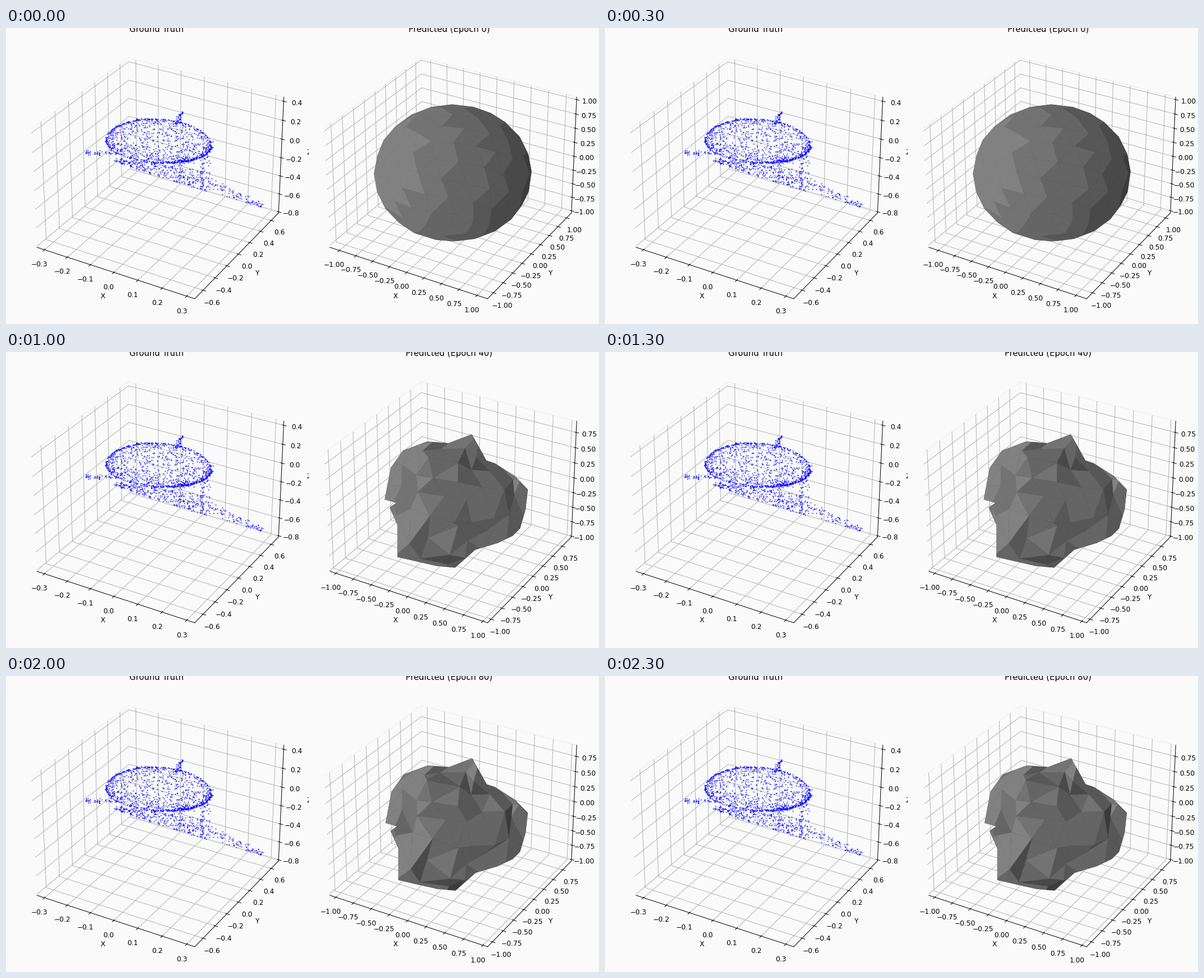
A matplotlib script that plays this animation: 1058 px wide and 529 px high, repeating every 2.5 s.

```python
from itertools import combinations

import matplotlib.pyplot as plt
import numpy as np
from matplotlib.animation import FuncAnimation
from matplotlib.patches import Polygon
from matplotlib.ticker import MultipleLocator
from mpl_toolkits.mplot3d.art3d import Poly3DCollection

WIDTH, HEIGHT = 1058, 529
BG = "#fafafa"
SIDE, TOP, LEFT_X, RIGHT_X = 501, 14.5, 17.5, 540
STEPS = 5

# Camera basis for elev=30, azim=-60 and the 4:4:3 box in view units.
RIGHTWARD = np.array([0.866025, 0.5, 0])
UPWARD = np.array([-0.25, 0.433013, 0.866025])
TOWARD = np.array([0.433013, -0.75, 0.5])
BOX = np.array([1.190476, 1.190476, 0.892857])
LIGHT = np.array([-2, -2, 1]) / 3

CLOUD_LIMITS = [(-0.333, 0.332), (-0.735, 0.74), (-0.8126, 0.443)]

# Corners of the fitted blob and the spots where its surface folds inward.
CENTER = np.array([797, 262])
OUTLINE = np.array([
    (831, 147), (857, 194), (872, 199), (908, 222), (931, 246), (927, 282),
    (917, 316), (904, 329), (877, 342), (837, 354), (801, 386), (768, 383),
    (698, 367), (698, 310), (684, 278), (696, 270), (675, 264), (686, 207),
    (708, 176), (751, 160), (789, 163)])
FOLDS = [(805, 195), (838, 188), (820, 306), (786, 368), (770, 247)]


def bounce(step):
    """A late, short squeeze while the fit settles."""
    return np.exp(-((step - 3.2) / 0.75) ** 2)


def mesh_limits(step):
    b = bounce(step)
    return [(-1.085 - 0.06 * np.exp(-2 * step), 1.06 + 0.086 * np.exp(-2 * step)),
            (-1.065 - 0.08 * np.exp(-2 * step) - 0.14 * b,
             0.985 + 0.16 * np.exp(-1.3 * step)),
            (-1.01 - 0.03 * np.exp(-3 * step) - 0.045 * b,
             0.932 + 0.11 * np.exp(-3 * step))]


def unproject(screen, depth, left, limits):
    """Turn stage pixels plus a depth toward the viewer into data coordinates."""
    x = (screen[..., 0] - left) / SIDE * 0.185 - 0.095
    y = 0.09 - (screen[..., 1] - TOP) / SIDE * 0.185
    reach = 10 - depth
    point = ((x * reach)[..., None] * RIGHTWARD + (y * reach)[..., None] * UPWARD
             + depth[..., None] * TOWARD)
    low, high = np.array(limits).T
    return (low + high) / 2 + point / BOX * (high - low)


def unit(v):
    return v / np.linalg.norm(v, axis=-1, keepdims=True)


def icosphere(level):
    golden = (1 + 5 ** 0.5) / 2
    corners = unit(np.array([np.roll((0, s, t * golden), k)
                             for k in range(3) for s in (-1, 1) for t in (-1, 1)]))
    faces = []
    for a, b, c in combinations(corners, 3):
        if max(np.linalg.norm(p - q) for p, q in ((a, b), (b, c), (c, a))) < 1.1:
            outward = np.cross(b - a, c - a) @ (a + b + c) > 0
            faces.append((a, b, c) if outward else (a, c, b))
    faces = np.array(faces)
    for _ in range(level):
        a, b, c = faces.transpose(1, 0, 2)
        ab, bc, ca = unit(a + b), unit(b + c), unit(c + a)
        faces = np.concatenate([np.stack(f, axis=1) for f in
                                ((a, ab, ca), (ab, b, bc), (ca, bc, c), (ab, bc, ca))])
    return faces


def vertex_noise(faces):
    flat = np.round(faces.reshape(-1, 3), 5) + 0.0
    points, index = np.unique(flat, axis=0, return_inverse=True)
    noise = np.random.default_rng(4).normal(size=points.shape)
    return noise[index.reshape(-1)].reshape(faces.shape)


FACES = icosphere(2)
NOISE = vertex_noise(FACES)


def outline_at(step):
    anchor = np.array([931, 147])
    return anchor + (OUTLINE - anchor) * (1 - bounce(step) * np.array([0.025, 0.033]))


def deform(step, outline):
    """Stretch the sphere over the outline and roughen it."""
    rough = 0.05 * (1 - np.exp(-0.5 * step))
    offsets = outline - CENTER
    angles = np.arctan2(offsets[:, 1], offsets[:, 0])
    radii = np.hypot(*offsets.T)
    x, y, z = FACES @ RIGHTWARD, -(FACES @ UPWARD), FACES @ TOWARD
    theta = np.arctan2(y, x)
    radius = 1.1 * np.max([np.interp(theta + d, angles, radii, period=2 * np.pi)
                           for d in np.linspace(-0.2, 0.2, 9)], axis=0)
    screen = CENTER + radius[..., None] * np.stack([x, y], axis=-1)
    screen += NOISE[..., :2] * rough * 200
    depth = 0.28 * z + NOISE[..., 2] * rough
    return screen, unproject(screen, depth, RIGHT_X, mesh_limits(step))


def brightness(triangles):
    a, b, c = triangles.transpose(1, 0, 2)
    return 83.2 + 44.8 * (unit(np.cross(b - a, c - a)) @ LIGHT)


def fold_shadow(screen):
    middle = screen.mean(axis=1)
    near = [np.hypot(*(middle - fold).T) < 20 for fold in FOLDS]
    return 24 * np.any(near, axis=0)


def stepped_gray(value):
    level = np.clip(np.round((value - 60) / 16), -1, 4)
    tone = (73 + 14 * level) / 255
    return np.repeat(tone[:, None], 3, axis=1)


def point_cloud():
    rng = np.random.default_rng(11)
    parts = []

    def add(x, y):
        parts.append(np.stack([x, y], axis=1))

    def shell(theta, r):
        x, y = 94 * r * np.cos(theta), r * np.sin(theta)
        add(272 + x, 206 + np.where(y < 0, 44, 35) * y + 0.05 * x)

    def rim(start, stop, count):
        shell(rng.uniform(start, stop, count), rng.normal(0.98, 0.025, count))

    z = rng.uniform(-1, 1, 900)
    shell(rng.uniform(0, 2 * np.pi, 900), np.sqrt(1 - z * z))
    rim(-0.2, 1.7, 140)
    rim(2.9, 4.6, 70)
    add(rng.normal(315, 6, 50), rng.normal(235, 5, 50))

    x = 190 + 165 * rng.uniform(0, 1, 320) ** 0.8
    add(x, 230 + 0.15 * (x - 190) + rng.uniform(0, 1, 320) * (8 + 0.18 * (x - 190)))
    t = rng.uniform(0, 1, 120) ** 1.1
    add(345 + 115 * t, 258 + 56 * t + rng.uniform(0, 1, 120) * (30 - 22 * t))
    add(rng.uniform(344, 364, 30), rng.uniform(228, 262, 30))
    add(rng.uniform(140, 197, 45), rng.normal(223, 2, 45))
    t = rng.uniform(0, 1, 45)
    add(306 + 11 * t ** 2 + rng.normal(0, 5, 45) * (1 - t), 173 - 26 * t)

    screen = np.concatenate(parts)
    return unproject(screen, rng.uniform(-0.2, 0.2, len(screen)), LEFT_X, CLOUD_LIMITS)


def make_axes(left, steps):
    ax = fig.add_axes([left / WIDTH, 1 - (TOP + SIDE) / HEIGHT,
                       SIDE / WIDTH, SIDE / HEIGHT],
                      projection="3d", facecolor=BG)
    ax.set(xlabel="X", ylabel="Y", zlabel="Z")
    for axis, step in zip((ax.xaxis, ax.yaxis, ax.zaxis), steps):
        axis.set_major_locator(MultipleLocator(step))
        axis.set_pane_color(BG, alpha=1)
        axis.pane.set_edgecolor("#f0f0f0")
    return ax


def make_title(left, text):
    return fig.text((left + SIDE / 2) / WIDTH, 1 - 7 / HEIGHT, text,
                    fontsize=12, ha="center", va="baseline")


def set_limits(ax, limits):
    for setter, (low, high) in zip((ax.set_xlim, ax.set_ylim, ax.set_zlim), limits):
        setter(low, high, view_margin=0)


fig = plt.figure(figsize=(12, 6), dpi=WIDTH / 12, facecolor=BG)

truth = make_axes(LEFT_X, (0.1, 0.2, 0.2))
truth.scatter(*point_cloud().T, s=1, linewidths=0.6, color="blue", alpha=0.75,
              depthshade=False)
set_limits(truth, CLOUD_LIMITS)
make_title(LEFT_X, "Ground Truth")

predicted = make_axes(RIGHT_X, (0.25, 0.25, 0.25))
epoch_title = make_title(RIGHT_X, "")


def update(step):
    for old in list(predicted.collections):
        old.remove()
    if step == 0:
        triangles, clip = FACES, None
        gray = brightness(triangles)
    else:
        outline = outline_at(step)
        screen, triangles = deform(step, outline)
        gray = brightness(triangles) - fold_shadow(screen)
        corners = np.array([0, 1]) + outline / (WIDTH, -HEIGHT)
        clip = Polygon(corners, transform=fig.transFigure)
    mesh = Poly3DCollection(triangles, edgecolors="none", linewidths=0,
                            facecolors=stepped_gray(gray))
    predicted.add_collection3d(mesh)
    if clip:
        mesh.set_clip_path(clip)
    set_limits(predicted, mesh_limits(step))
    epoch_title.set_text(f"Predicted (Epoch {20 * step})")
    return [mesh]


anim = FuncAnimation(fig, update, frames=STEPS, interval=500,
                     repeat=True, repeat_delay=0, blit=False)
plt.show()
```
